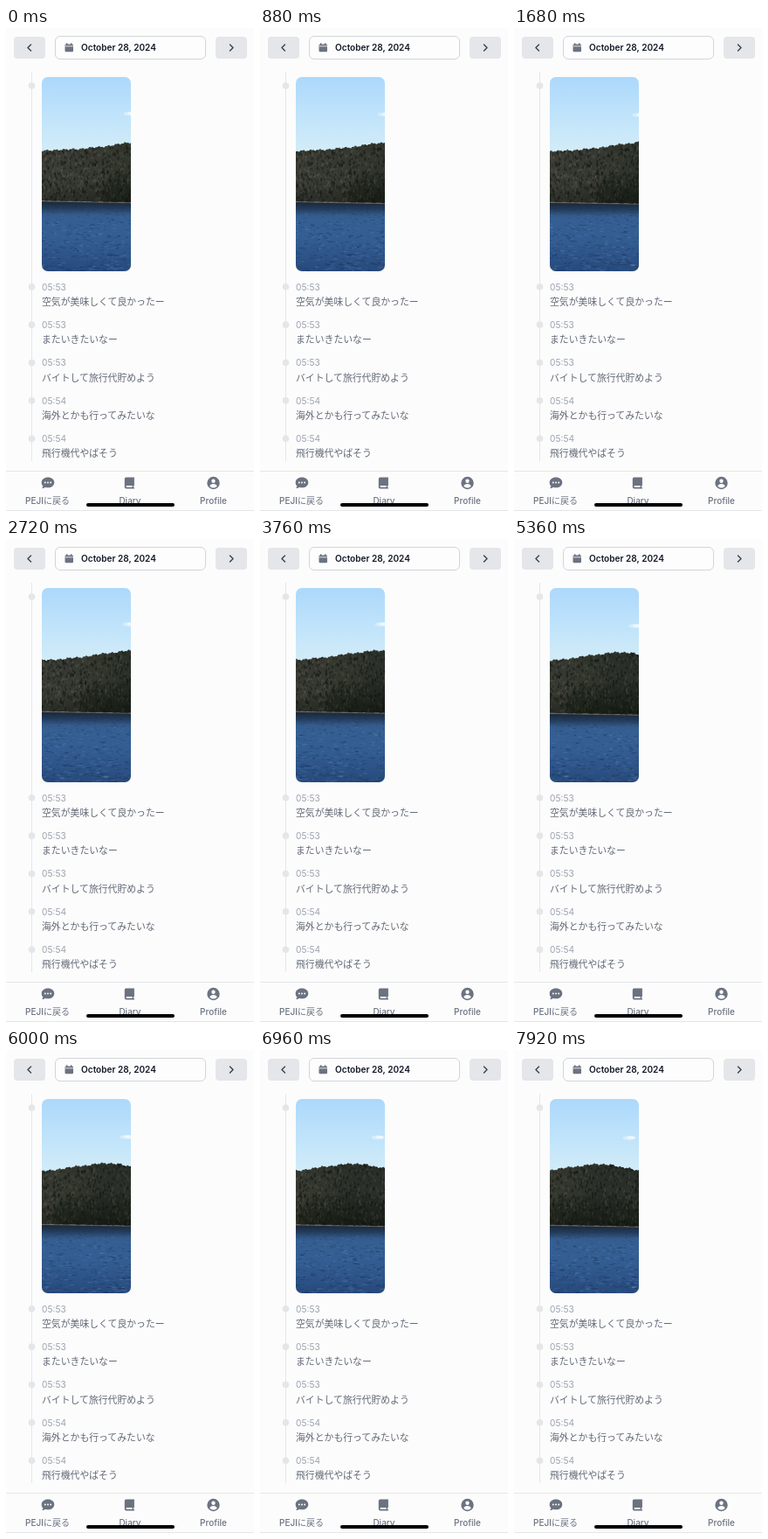
An HTML page with a canvas that plays this animation: 284x552 px, repeating every 8 s.

```html
<!DOCTYPE html>
<html lang="ja">
<head>
<meta charset="utf-8">
<title>Diary</title>
<style>
  html, body { margin: 0; width: 100%; height: 100%; overflow: hidden; background: #fcfcfc; }
  #stage { position: absolute; left: 0; top: 0; width: 284px; height: 552px; overflow: hidden; }
  svg, canvas { position: absolute; display: block; }
  svg { left: 0; top: 0; }
  canvas { left: 41px; top: 56px; width: 102px; height: 222px; border-radius: 7px; }
  text { font-family: Inter, "Noto Sans CJK JP", "Noto Sans CJK", sans-serif; font-size: 10px; fill: #6b7280; }
  .date { font-size: 10.1px; font-weight: 600; fill: #111827; }
  .time { font-size: 10.2px; fill: #9ca3af; }
  .note { font-family: "Noto Sans CJK JP", "Noto Sans CJK", sans-serif; font-size: 10.85px; fill: #626976; }
  .nav { font-weight: 500; text-anchor: middle; }
  .icon { fill: #6b7280; }
  .soft { fill: #e4e6ea; }
  .arrow { fill: none; stroke: #374151; stroke-width: 1.4; stroke-linecap: round; stroke-linejoin: round; }
</style>
</head>
<body>
<div id="stage">
  <svg width="284" height="552" viewBox="0 0 284 552">
    <rect class="soft" x="9" y="10" width="36" height="25" rx="4"/>
    <rect class="soft" x="240" y="10" width="36" height="25" rx="4"/>
    <path class="arrow" d="M28.5 19l-3.5 3.5 3.5 3.5M256.5 19l3.5 3.5-3.5 3.5"/>
    <rect x="56.5" y="9.5" width="172" height="26" rx="5.5" fill="#fdfdfd" stroke="#d1d5db"/>
    <g class="icon">
      <rect x="67.5" y="18.5" width="9.5" height="8.8" rx="1.3"/>
      <path d="M69 17.2h1.4v2H69zM74 17.2h1.4v2H74z"/>
    </g>
    <path d="M67.5 20.8h9.5" stroke="#fdfdfd" stroke-width=".8"/>
    <text class="date" x="86" y="26.2">October 28, 2024</text>

    <rect class="soft" x="29" y="50" width="1" height="445"/>
    <circle class="soft" cx="29.5" cy="66" r="3.8"/>
    <g id="notes"></g>

    <rect y="506" width="284" height="46" fill="#fcfcfc"/>
    <rect class="soft" y="506" width="284" height="1"/>
    <g class="icon">
      <path d="M48 513.5c4.2 0 7.3 2.6 7.3 5.9s-3.1 5.9-7.3 5.9c-1 0-2-.1-2.9-.5-1 .8-2.4 1.3-3.9 1.3.7-.8 1.1-1.7 1.2-2.6-1.1-1.1-1.7-2.5-1.7-4.1 0-3.3 3.1-5.9 7.3-5.9z"/>
      <path d="M137.6 513.5h9.3v9.5h-.8v2h.8v1.4h-9.1a2 2 0 0 1-2-2v-9a1.9 1.9 0 0 1 1.8-1.9z"/>
      <circle cx="237.5" cy="520" r="7.2"/>
    </g>
    <g fill="#fcfcfc">
      <circle cx="44.8" cy="519.4" r="1"/><circle cx="48" cy="519.4" r="1"/><circle cx="51.2" cy="519.4" r="1"/>
      <rect x="137.5" y="523" width="7.4" height="1.8" rx=".8"/>
      <circle cx="237.5" cy="517.8" r="2.2"/>
      <path d="M233.3 523.8c.5-1.8 1.8-2.7 4.2-2.7s3.7.9 4.2 2.7c-1.2 1.2-2.6 1.8-4.2 1.8s-3-.6-4.2-1.8z"/>
    </g>
    <text class="nav" x="47.5" y="543.6">PEJIに戻る</text>
    <text class="nav" x="142" y="543.6">Diary</text>
    <text class="nav" x="237.5" y="543.6">Profile</text>
    <rect x="92" y="543" width="101" height="4" rx="2" fill="#000"/>
    <rect class="soft" y="551" width="284" height="1"/>
  </svg>
  <canvas id="photo"></canvas>
</div>
<script>
const LOOP = 8000, STEP = 80, W = 102, H = 222;

document.getElementById('notes').innerHTML = [
  ['05:53', '空気が美味しくて良かったー'],
  ['05:53', 'またいきたいなー'],
  ['05:53', 'バイトして旅行代貯めよう'],
  ['05:54', '海外とかも行ってみたいな'],
  ['05:54', '飛行機代やばそう']
].map(([time, note], i) => {
  const y = 295.8 + i * 43.35;
  return `<circle class="soft" cx="29.5" cy="${y}" r="3.8"/>
    <text class="time" x="41" y="${y + 3.8}">${time}</text>
    <text class="note" x="41" y="${y + 21.2}">${note}</text>`;
}).join('');

const canvas = document.getElementById('photo');
const ctx = canvas.getContext('2d');
const ratio = window.devicePixelRatio || 1;
canvas.width = W * ratio;
canvas.height = H * ratio;

function random(seed) {
  return () => {
    seed = (seed * 16807) % 2147483647;
    return seed / 2147483647;
  };
}

// Smooth interpolation through [position, value] pairs
function along(points, x) {
  if (x <= points[0][0]) return points[0][1];
  for (let i = 1; i < points.length; i++) {
    const [x0, y0] = points[i - 1], [x1, y1] = points[i];
    if (x <= x1) {
      const k = (x - x0) / (x1 - x0);
      return y0 + (y1 - y0) * k * k * (3 - 2 * k);
    }
  }
  return points[points.length - 1][1];
}

const shoreY = [[0, 142], [1680, 143.5], [2720, 141.5], [3760, 141.5], [4720, 143.5], [6000, 143.5], [7920, 144.5]];
const cloudX = [[0, 101], [1680, 102], [2720, 100], [3760, 98], [4720, 99], [6000, 97], [7920, 91]];
const ridge = [[0, 58], [40, 59.5], [65, 62], [102, 67], [125, 70], [142, 69.5], [160, 66], [180, 62]];

const rnd = random(4127);
const leaves = Array.from({ length: 1500 }, () => ({
  x: rnd() * 190 - 4, v: rnd(), r: .5 + rnd() * 1.1, tone: rnd()
}));
const ripples = Array.from({ length: 650 }, () => ({
  x: rnd() * 130, v: rnd(), len: 1.2 + rnd() * 2.6, tone: rnd(), phase: rnd() * 6.28
}));

function fill(top, bottom, stops) {
  const g = ctx.createLinearGradient(0, top, 0, bottom);
  stops.forEach((c, i) => g.addColorStop(i / (stops.length - 1), c));
  ctx.fillStyle = g;
}

function ellipse(x, y, rx, ry) {
  ctx.beginPath();
  ctx.ellipse(x, y, rx, ry, 0, 0, Math.PI * 2);
  ctx.fill();
}

function drawSky(t, shore) {
  fill(0, 85, ['#acd8fb', '#bfe3fb', '#d3ecf7']);
  ctx.fillRect(0, 0, W, H);
  const x = along(cloudX, t), y = shore - 100;
  ctx.fillStyle = 'rgba(245,250,253,.45)';
  ellipse(x, y, 7.5, 2.4);
  ctx.fillStyle = 'rgba(250,252,254,.7)';
  ellipse(x + 2, y - .4, 4.5, 1.7);
}

function drawHill(t, shore) {
  const pan = t * .00935;
  const edge = x => shore + x * .018;
  const top = w => shore - along(ridge, w)
    + Math.sin(w * 1.7) * .5 + Math.sin(w * .63 + 1) * .7 + Math.sin(w * 3.1) * .5;
  ctx.save();
  ctx.beginPath();
  ctx.moveTo(0, edge(0));
  for (let x = 0; x <= W; x++) ctx.lineTo(x, top(x + pan));
  ctx.lineTo(W, edge(W));
  ctx.closePath();
  ctx.clip();

  const base = ctx.createLinearGradient(-pan, 0, 180 - pan, 0);
  base.addColorStop(0, '#3a3c36');
  base.addColorStop(.45, '#34372f');
  base.addColorStop(.7, '#2a3029');
  base.addColorStop(1, '#292e28');
  ctx.fillStyle = base;
  ctx.fillRect(0, 0, W, H);

  // Dark thicket near the water
  fill(shore - 40, shore, ['rgba(20,27,19,.2)', 'rgba(20,27,19,.65)']);
  ctx.beginPath();
  ctx.moveTo(68 - pan, shore + 3);
  ctx.quadraticCurveTo(70 - pan, shore - 26, 84 - pan, shore - 30);
  ctx.lineTo(130 - pan, shore - 36);
  ctx.lineTo(190 - pan, shore - 30);
  ctx.lineTo(190 - pan, shore + 3);
  ctx.fill();

  for (const l of leaves) {
    const x = l.x - pan;
    if (x < -3 || x > W + 3) continue;
    const y0 = top(l.x);
    const y = y0 + l.v * (shore - y0);
    ctx.fillStyle = l.tone < .5 ? 'rgba(13,17,13,.42)'
      : l.x > 75 ? 'rgba(74,82,64,.36)' : 'rgba(96,93,82,.36)';
    ellipse(x, y, l.r * .75, l.r * 1.5);
  }
  fill(shore - 24, shore, ['rgba(16,20,15,0)', 'rgba(16,20,15,.4)']);
  ctx.fillRect(0, shore - 24, W, 28);
  ctx.restore();
}

function drawWater(t, shore) {
  const depth = H - shore;
  ctx.save();
  ctx.beginPath();
  ctx.moveTo(0, shore);
  ctx.lineTo(W, shore + W * .018);
  ctx.lineTo(W, H);
  ctx.lineTo(0, H);
  ctx.clip();
  fill(shore, H, ['#2b4a6e', '#355f92', '#345e93', '#2e558a', '#26497a']);
  ctx.fillRect(0, shore, W, depth);
  for (const r of ripples) {
    const speed = .01 + r.v * .012;
    const x = (((r.x - t * speed) % 130) + 130) % 130 - 14;
    const y = shore + 2 + r.v * depth + Math.sin(t * .003 + r.phase) * .7;
    const glow = .16 + .1 * Math.sin(t * .005 + r.phase);
    ctx.fillStyle = r.tone < .55 ? `rgba(18,39,70,${glow + .1})` : `rgba(112,152,198,${glow})`;
    ellipse(x, y, r.len * (.6 + r.v * .5), .4 + r.v * .35);
  }
  // Reflection of the bank
  fill(shore, shore + 15, ['rgba(22,32,46,.85)', 'rgba(24,38,58,.55)', 'rgba(24,42,68,0)']);
  ctx.fillRect(0, shore, W, 15);
  ctx.restore();
}

function drawBank(t, shore) {
  const pan = t * .00935;
  ctx.save();
  ctx.transform(1, .018, 0, 1, 0, shore);
  ctx.fillStyle = 'rgba(106,100,91,.75)';
  ctx.fillRect(0, -.7, W, 1.2);
  ctx.fillStyle = 'rgba(160,149,134,.45)';
  for (let i = 0; i < 20; i++) {
    ctx.fillRect(i * 9.4 + Math.sin(i * 5) * 3 - pan, -.9, 4 + Math.sin(i * 3) * 2, .9);
  }
  ctx.restore();
}

function draw(now) {
  const t = Math.floor((now % LOOP) / STEP) * STEP;
  const shore = along(shoreY, t);
  ctx.setTransform(ratio, 0, 0, ratio, 0, 0);
  drawSky(t, shore);
  drawHill(t, shore);
  drawWater(t, shore);
  drawBank(t, shore);
}

let start;
function tick(now) {
  if (start === undefined) start = now;
  draw(now - start);
  requestAnimationFrame(tick);
}
draw(0);
requestAnimationFrame(tick);
</script>
</body>
</html>
```
